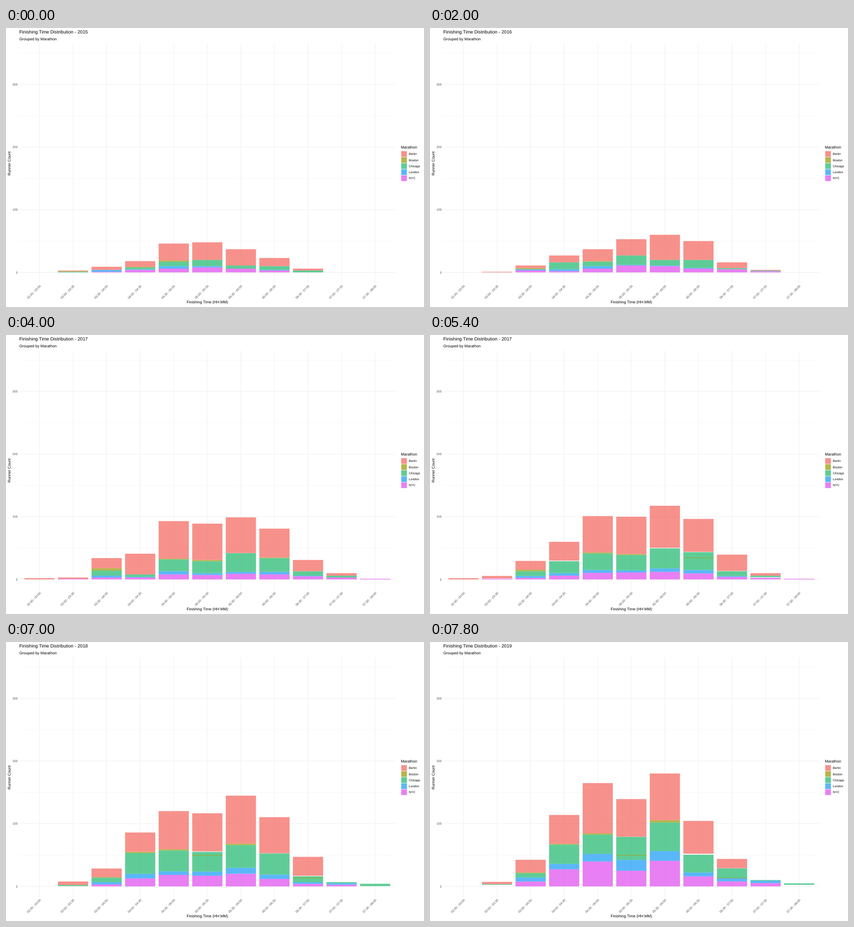
Animation of 917 by 611 pixels, one loop 8 s. Source, as an HTML page:

```html
<!DOCTYPE html>
<html lang="en">
<head>
<meta charset="utf-8">
<title>Finishing Time Distribution</title>
<style>
  html, body { margin: 0; width: 100%; height: 100%; overflow: hidden; background: #fff; }
  svg { display: block; width: 100vw; height: 100vh; }
  text { font-family: "Liberation Sans", Arial, sans-serif; font-size: 8.45px; text-rendering: geometricPrecision; }
  .small { font-size: 6.76px; }
  .tick { font-size: 6.76px; fill: #4d4d4d; }
</style>
</head>
<body>
<svg id="stage" viewBox="0 0 917 611"></svg>
<script>
const stage = document.getElementById('stage');
const LOOP = 8000, STEP = 200, SEGMENT = 2000, FIRST_YEAR = 2015;
const BINS = 11, PANEL = { left: 29.3, right: 854, top: 34, bottom: 559 };
const GAP = (PANEL.right - PANEL.left) / (BINS + 0.2);
const BAR = GAP * 0.9;
const binX = i => PANEL.left + (i + 0.6) * GAP;
const countY = n => 535.2 - n * 1.372;

// Stacked from the bottom up
const races = [
  ['NYC', '#e35ff1'], ['London', '#31a6f7'], ['Chicago', '#37c07e'],
  ['Boston', '#a3a323'], ['Berlin', '#f6766e']
];

function add(tag, attrs, text) {
  const el = document.createElementNS('http://www.w3.org/2000/svg', tag);
  for (const key in attrs) el.setAttribute(key, attrs[key]);
  if (text) el.textContent = text;
  return stage.appendChild(el);
}

const line = (x1, y1, x2, y2, w) => add('line', { x1, y1, x2, y2, stroke: '#ebebeb', 'stroke-width': w });
const label = (x, y, text, attrs) => add('text', { x, y, ...attrs }, text);

// Runner counts per bin as [NYC, London, Chicago, Boston, Berlin]
const years = [];
function addYear(firstBin, rows) {
  const bins = Array.from({ length: BINS }, () => []);
  rows.forEach((row, i) => {
    let base = 0;
    bins[firstBin + i] = row.map(n => n ? { lo: base, hi: base += n } : null);
  });
  years.push(bins);
}

addYear(1, [
  [0, 0, 1, 1, 1], [1, 3, 0, 0, 5], [4, 1, 3, 1, 9], [6, 4, 7, 2, 27],
  [8, 2, 10, 0, 28], [6, 0, 5, 0, 26], [3, 1, 6, 0, 13], [0, 0, 3, 0, 3]
]);
addYear(1, [
  [0, 0, 0, 0, 1], [3, 2, 0, 2, 4], [2, 3, 11, 0, 11], [6, 4, 7, 1, 19], [11, 1, 15, 0, 26],
  [10, 1, 9, 0, 40], [6, 1, 13, 0, 30], [5, 0, 2, 0, 9], [2, 0, 1, 0, 1]
]);
addYear(0, [
  [0, 0, 0, 0, 2], [1, 0, 0, 0, 2], [3, 3, 8, 4, 16], [3, 1, 4, 0, 33],
  [8, 5, 19, 1, 60], [7, 3, 19, 2, 58], [9, 3, 30, 0, 57], [8, 4, 22, 1, 46],
  [5, 1, 7, 0, 18], [3, 0, 3, 0, 4], [1, 0, 0, 0, 0]
]);
addYear(1, [
  [0, 0, 2, 0, 6], [2, 3, 7, 1, 12], [9, 7, 34, 2, 27], [13, 4, 34, 2, 56], [15, 4, 30, 1, 61],
  [15, 8, 34, 2, 77], [11, 7, 35, 0, 59], [3, 2, 8, 1, 34], [2, 2, 2, 0, 0], [0, 0, 4, 0, 0]
]);
addYear(1, [
  [2, 1, 1, 0, 3], [9, 7, 7, 1, 22], [31, 9, 30, 1, 50], [45, 14, 30, 2, 85], [27, 20, 38, 0, 60],
  [46, 17, 48, 4, 74], [17, 6, 27, 2, 51], [9, 6, 17, 0, 11], [6, 4, 1, 0, 0], [1, 2, 2, 0, 0]
]);

// Grid and axes
for (let n = 50; n <= 350; n += 100) line(PANEL.left, countY(n), PANEL.right, countY(n), 0.45);
for (let n = 0; n <= 300; n += 100) {
  line(PANEL.left, countY(n), PANEL.right, countY(n), 0.9);
  label(25.6, countY(n) + 2.4, String(n), { class: 'tick', 'text-anchor': 'end' });
}
const clock = half => `${String(half >> 1).padStart(2, '0')}:${half % 2 ? '30' : '00'}`;
for (let i = 0; i < BINS; i++) {
  line(binX(i), PANEL.top, binX(i), PANEL.bottom, 0.9);
  label(0, 0, `${clock(i + 5)} - ${clock(i + 6)}`, {
    class: 'tick', 'text-anchor': 'end', transform: `translate(${binX(i) + 3.4} 565.7) rotate(-45)`
  });
}
label(441.7, 603.4, 'Finishing Time (HH:MM)', { 'text-anchor': 'middle' });
label(0, 0, 'Runner Count', { 'text-anchor': 'middle', transform: 'translate(10.2 296.7) rotate(-90)' });
label(29.2, 26.8, 'Grouped by Marathon');
const title = label(29.2, 11.7, ' ', { style: 'font-size:10.14px' });

// Legend
label(866.2, 264.4, 'Marathon');
[...races].reverse().forEach(([name, fill], i) => {
  const y = 269.3 + i * 13.27;
  add('rect', { x: 867.1, y: y + 0.4, width: 12.4, height: 12.4, fill, 'fill-opacity': 0.8 });
  label(883.8, y + 9.1, name, { class: 'small' });
});

const bars = Array.from({ length: BINS }, (_, i) => races.map(([, fill]) =>
  add('rect', { x: binX(i) - BAR / 2, width: BAR, height: 0, fill, 'fill-opacity': 0.8 })));

const mix = (a, b, p) => a + (b - a) * p;

function render(t) {
  const seg = Math.floor(t / SEGMENT), local = t % SEGMENT;
  const start = seg ? 1000 : 800;
  const p = Math.max(0, Math.floor((local - start) / STEP) + 1) * STEP / (SEGMENT - start + STEP);
  title.textContent = `Finishing Time Distribution - ${FIRST_YEAR + seg + (local >= 1600 ? 1 : 0)}`;
  bars.forEach((stack, i) => stack.forEach((rect, k) => {
    const from = years[seg][i][k];
    // Leaving pieces stay put, entering ones wait for the next year
    const to = years[seg + 1][i][k] || from;
    const lo = from ? mix(from.lo, to.lo, p) : 0;
    const hi = from ? mix(from.hi, to.hi, p) : 0;
    rect.setAttribute('y', countY(hi));
    rect.setAttribute('height', countY(lo) - countY(hi));
  }));
}

const begin = performance.now();
function tick() {
  render((performance.now() - begin) % LOOP);
  requestAnimationFrame(tick);
}
tick();
</script>
</body>
</html>
```
